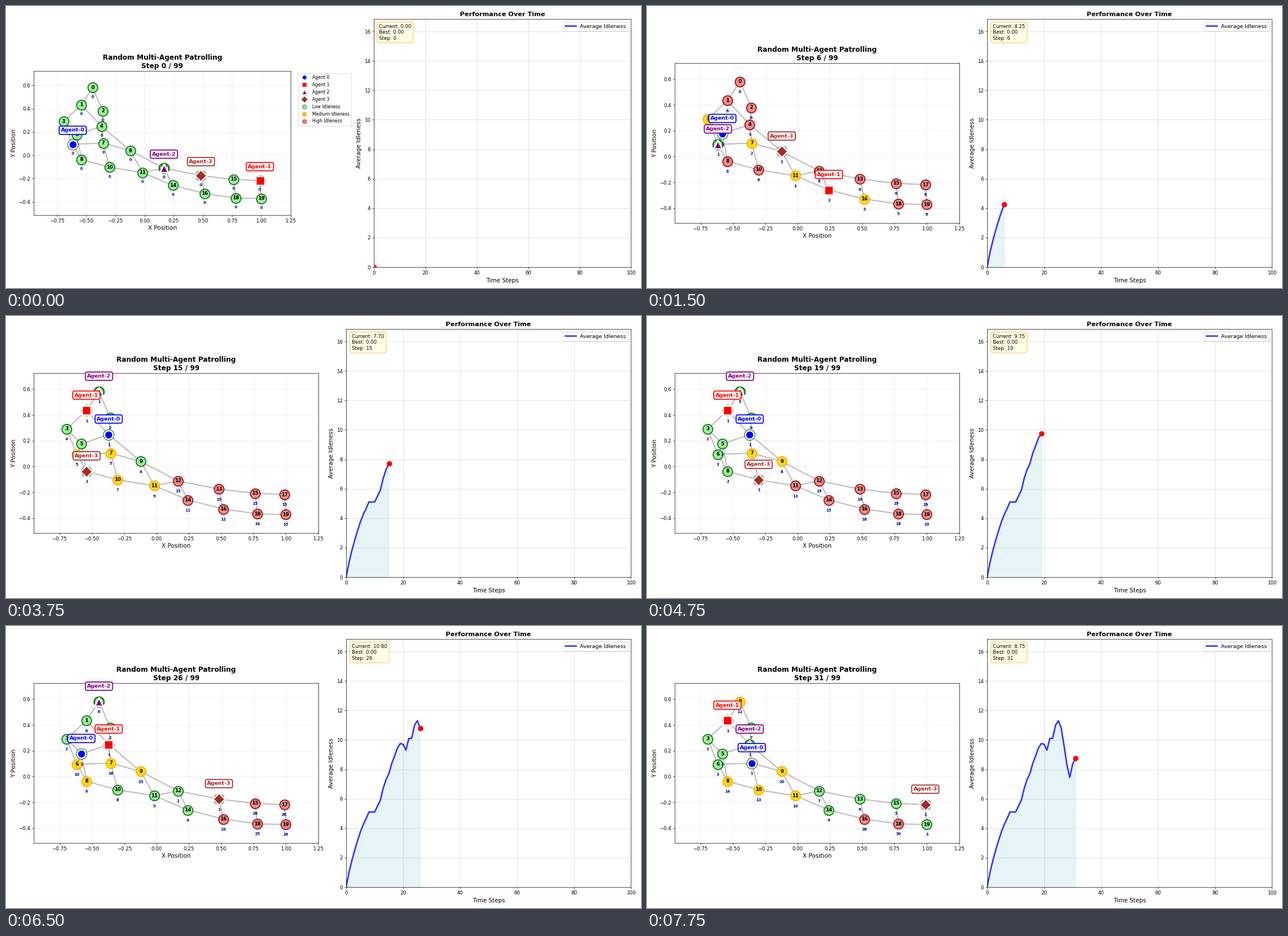
These frames come from a looping animation (1122 px wide and 499 px high, 8000 ms). A matplotlib script:

```python
import numpy as np
import matplotlib.pyplot as plt
from matplotlib.animation import FuncAnimation
from matplotlib.lines import Line2D

W, H, DPI = 1122, 499, 62.375
STEPS, TOTAL = 32, 99

POS = np.array([
    (-.445, .580), (-.542, .433), (-.358, .379), (-.695, .291), (-.370, .248),
    (-.581, .175), (-.616, .094), (-.354, .104), (-.541, -.037), (-.122, .039),
    (-.301, -.103), (-.017, -.149), (.166, -.111), (.483, -.175), (.243, -.259),
    (.762, -.207), (.517, -.329), (.988, -.218), (.781, -.367), (1.0, -.371)])

# The outer ring of the graph, then the chains that cross it
CHAINS = ((0, 1, 3, 6, 8, 10, 11, 14, 16, 18, 19, 17, 15, 13, 12, 9, 4, 2, 0),
          (1, 4, 5, 8), (3, 5, 6, 7, 9, 11, 12, 14), (4, 7, 10), (13, 16),
          (15, 18))
EDGES = [edge for chain in CHAINS for edge in zip(chain, chain[1:])]

# Each agent: colour, marker, (step, node) stops
AGENTS = (
    ("blue", "o", ((0, 6), (5, 3), (6, 5), (10, 2), (15, 4), (16, 2), (18, 5),
                   (19, 4), (25, 3), (26, 5), (28, 7), (29, 6), (31, 7))),
    ("red", "s", ((0, 17), (2, 18), (5, 14), (7, 11), (10, 8), (12, 3), (14, 3),
                  (15, 1), (20, 3), (23, 4), (25, 2), (26, 4), (29, 3),
                  (31, 1))),
    ("purple", "^", ((0, 12), (2, 4), (3, 7), (6, 6), (9, 0), (13, 1), (15, 0),
                     (19, 0), (20, 2), (21, 0), (26, 0), (27, 1), (30, 5),
                     (31, 4))),
    ("brown", "D", ((0, 13), (2, 11), (3, 9), (4, 11), (6, 9), (11, 7), (12, 9),
                    (14, 5), (15, 8), (17, 6), (19, 10), (21, 12), (22, 11),
                    (23, 14), (25, 12), (28, 17), (29, 19), (31, 17))),
)

LOW, MEDIUM, HIGH = (("lightgreen", "darkgreen"), ("gold", "orange"),
                     ("lightcoral", "darkred"))


def hop_counts():
    n = len(POS)
    hops = np.full((n, n), n)
    np.fill_diagonal(hops, 0)
    for a, b in EDGES:
        hops[a, b] = hops[b, a] = 1
    for k in range(n):
        hops = np.minimum(hops, hops[:, [k]] + hops[[k]])
    return hops


HOPS = hop_counts()


def shortest(a, b):
    path = []
    while a != b:
        a = max(n for n in np.flatnonzero(HOPS[a] == 1)
                if HOPS[n, b] < HOPS[a, b])
        path.append(a)
    return path


def walk(stops):
    """Shortest way between stops; spare time is spent pacing the first edge."""
    spots = [stops[0][1]]
    for (t0, a), (t1, b) in zip(stops, stops[1:]):
        path = shortest(a, b)
        spare = t1 - t0 - len(path)
        if path:
            spots += [a] * (spare % 2) + [path[0], a] * (spare // 2) + path
        else:
            spots += [a] * spare
    return spots


def simulate(walks):
    """Idleness of every node at every step; an arrival resets a node."""
    idle = np.zeros((STEPS, len(POS)), int)
    for t in range(1, STEPS):
        idle[t] = idle[t - 1] + 1
        for spots in walks:
            if spots[t] != spots[t - 1]:
                idle[t, spots[t]] = 1
    return idle


WALKS = [walk(stops) for _, _, stops in AGENTS]
IDLE = simulate(WALKS)
MEAN = IDLE.mean(axis=1)


def level(value, top):
    ratio = value / max(top, 1)
    return LOW if ratio < .33 else MEDIUM if ratio < .67 else HIGH


def place(ax, x0, x1):
    ax.set_position([x0 / W, (H - 462) / H, (x1 - x0) / W, 439 / H])


def map_legend(ax):
    keys = [Line2D([], [], ls="", marker=m, mfc=c, mec="white", ms=9,
                   label=f"Agent {i}") for i, (c, m, _) in enumerate(AGENTS)]
    looks = (("Low", "lightgreen", "green"), ("Medium", "#ffb32e", "orange"),
             ("High", "lightcoral", "#c01020"))
    keys += [Line2D([], [], ls="", marker="o", mfc=f, mec=e, ms=8,
                    label=f"{name} Idleness") for name, f, e in looks]
    ax.legend(handles=keys, loc="upper left", bbox_to_anchor=(1.02, 1),
              fontsize=9)


def draw_map(ax, t):
    ax.clear()
    place(ax, 49.2, 503.4 if t == 0 else 552.4)
    idle, spots = IDLE[t], [spots[t] for spots in WALKS]
    for edge in EDGES:
        ax.plot(*POS[list(edge)].T, color="gray", alpha=.6, lw=2, zorder=1)
    bold = dict(weight="bold", ha="center", va="center")
    for i, (x, y) in enumerate(POS):
        face, rim = level(idle[i], idle.max())
        ax.scatter(x, y, s=400, c=face, edgecolors=rim, alpha=.9,
                   linewidths=3 if i in spots else 2, zorder=2)
        ax.text(x, y, i, size=10, zorder=3, **bold)
        ax.text(x, y - .08, idle[i], size=8, color="darkblue", zorder=3, **bold)
    for i, (color, marker, _) in enumerate(AGENTS):
        x, y = POS[spots[i]]
        ax.scatter(x, y, s=300, c=color, marker=marker, edgecolors="white",
                   linewidths=3, zorder=4)
        ax.text(x, y + .12, f"Agent-{i}", size=11, color=color, zorder=5,
                bbox=dict(boxstyle="round,pad=0.3", fc=(1, 1, 1, .9),
                          ec=color, lw=2), **bold)
    ax.set_aspect("equal")
    ax.set(xlim=(-.949, 1.254), ylim=(-.5135, .7225),
           xticks=np.arange(-3, 6) * .25, yticks=np.arange(-2, 4) * .2)
    ax.set_xlabel("X Position", size=12)
    ax.set_ylabel("Y Position", size=12)
    ax.set_title(f"Random Multi-Agent Patrolling\nStep {t} / {TOTAL}",
                 size=14, weight="bold")
    ax.grid(alpha=.3)
    ax.set_axisbelow(True)
    if t == 0:
        map_legend(ax)


def draw_chart(ax, t):
    ax.clear()
    place(ax, 650 if t == 0 else 601, 1104.4)
    x, y = np.arange(t + 1), MEAN[:t + 1]
    ax.plot(x, y, color="blue", lw=3, alpha=.8, label="Average Idleness")
    ax.fill_between(x, y, color="lightblue", alpha=.3)
    ax.plot(t, y[-1], "ro", ms=10, zorder=5)
    ax.set(xlim=(0, 100), ylim=(0, 16.85), xticks=range(0, 101, 20),
           yticks=range(0, 17, 2))
    ax.set_xlabel("Time Steps", size=12)
    ax.set_ylabel("Average Idleness", size=12)
    ax.set_title("Performance Over Time", size=13, weight="bold")
    ax.grid(alpha=.5)
    ax.legend(loc="upper right", fontsize=11)
    ax.text(.02, .98, f"Current: {y[-1]:.2f}\nBest: {y.min():.2f}\nStep: {t}",
            transform=ax.transAxes, size=10, va="top",
            bbox=dict(boxstyle="round,pad=0.4", fc="lightyellow", ec="orange",
                      alpha=.8))


def update(t):
    draw_map(map_ax, t)
    draw_chart(chart_ax, t)
    return []


fig, (map_ax, chart_ax) = plt.subplots(
    1, 2, figsize=((W + 1e-6) / DPI, (H + 1e-6) / DPI), dpi=DPI)
anim = FuncAnimation(fig, update, frames=STEPS, init_func=lambda: [],
                     interval=250, repeat=True, repeat_delay=0)
plt.show()
```
